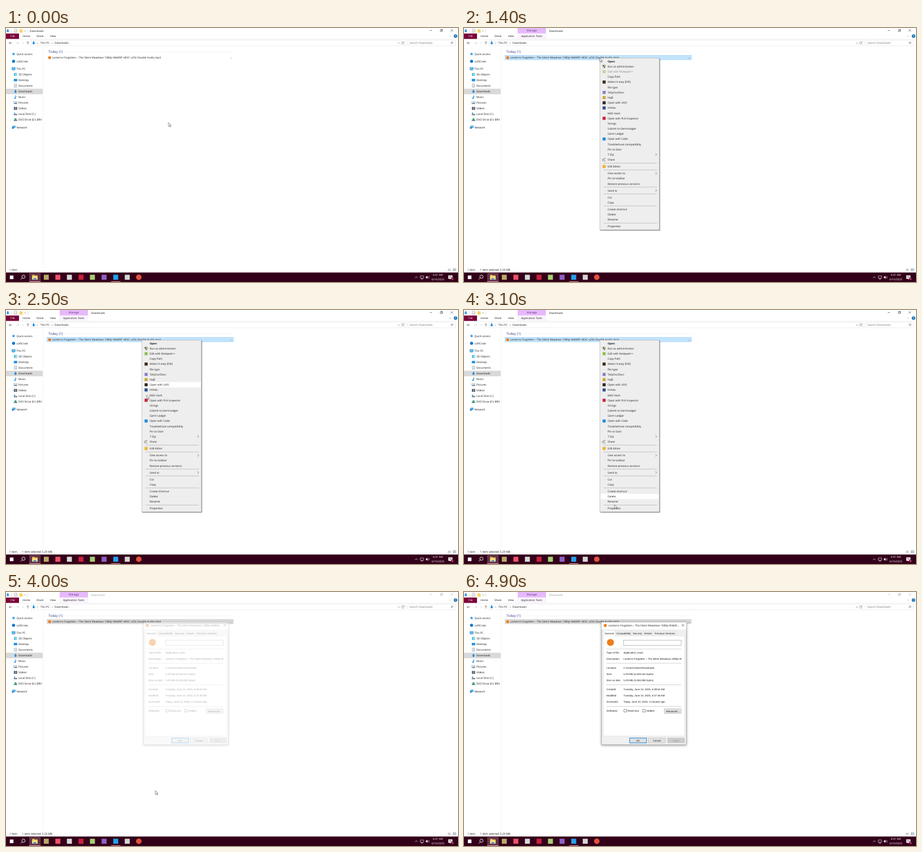
An HTML page for the animation above (5000 ms loop, 800 px wide and 450 px high).

```html
<!DOCTYPE html>
<html lang="en">
<head>
<meta charset="utf-8">
<title>Downloads</title>
<style>
html, body { margin: 0; width: 100%; height: 100%; overflow: hidden; background: #fff; }
svg { display: block; width: 800px; height: 450px; }
text { font-family: "Open Sans", "Noto Sans", sans-serif; text-rendering: geometricPrecision; white-space: pre; }
.dlg text.ms { font-family: "Liberation Sans", Arial, sans-serif; }

.plain, .picked, .hover, .blue, .grey, .menu { animation: 5s step-end infinite; }
.plain { animation-name: plain; }
.picked { animation-name: picked; }
.hover { animation-name: hover; }
.blue { animation-name: blue; }
.grey { animation-name: grey; }
.menu { animation-name: menu; }
.caption { animation: caption 5s step-end infinite; }
.late { animation: late 5s step-end infinite; }
.bar { animation: bar 5s step-end infinite; }
.ghost { animation: ghost 5s linear infinite; }
.dlg { animation: dlg 5s linear infinite; filter: drop-shadow(0 1px 2px rgba(0,0,0,.42)); }
.cursor { animation: move 5s linear infinite, gone 5s step-end infinite; }

@keyframes plain { 0% { opacity: 1 } 22%, 100% { opacity: 0 } }
@keyframes picked { 0% { opacity: 0 } 22%, 100% { opacity: 1 } }
@keyframes hover { 0% { opacity: 0 } 12% { opacity: 1 } 22%, 100% { opacity: 0 } }
@keyframes blue { 0% { opacity: 0 } 22% { opacity: 1 } 80%, 100% { opacity: 0 } }
@keyframes grey { 0% { opacity: 0 } 80%, 100% { opacity: 1 } }
@keyframes menu { 0% { opacity: 0 } 28% { opacity: 1 } 70%, 100% { opacity: 0 } }
@keyframes caption { 0% { opacity: 1 } 80%, 100% { opacity: .42 } }
@keyframes late { 0% { opacity: .5 } 40%, 100% { opacity: 1 } }
@keyframes ghost { 0%, 69.99% { opacity: 0 } 70% { opacity: 1 } 72% { opacity: .75 } 74%, 100% { opacity: 0 } }
@keyframes dlg { 0%, 79% { opacity: 0 } 82%, 100% { opacity: 1 } }
@keyframes bar {
  0% { transform: translateY(-20px) }
  46% { transform: translateY(68.3px) }
  48% { transform: translateY(105px) }
  50% { transform: translateY(132.5px) }
  52% { transform: translateY(169.2px) }
  54% { transform: translateY(196.7px) }
  56% { transform: translateY(233.4px) }
  58% { transform: translateY(266.7px) }
  60% { transform: translateY(300px) }
  62% { transform: translateY(330.3px) }
  64%, 100% { transform: translateY(351.6px) }
}
@keyframes move {
  0% { transform: translate(287.5px, 167.5px); animation-timing-function: ease-in-out }
  14% { transform: translate(241.5px, 51.5px) }
  20%, 44% { transform: translate(240.3px, 53px) }
  62% { transform: translate(266.5px, 345px); animation-timing-function: ease-out }
  67%, 72% { transform: translate(265.5px, 354.5px) }
  82%, 100% { transform: translate(264px, 351px) }
}
@keyframes gone { 0% { opacity: 1 } 90%, 100% { opacity: 0 } }
</style>
</head>
<body>
<svg id="stage" viewBox="0 0 800 450" xmlns="http://www.w3.org/2000/svg"></svg>
<script>
const INK = '#1b1b1b', WINE = '#7b0038', SKY = '#2389d7', CONE = '#ee7d1b';
const FILM = 'Lanterns Forgotten – The Silent Meadows';

// Text is placed by its left edge and vertical centre.
const text = (x, y, s, { size = 4.75, fill = INK, more = '' } = {}) =>
  `<text x="${x}" y="${(y + size * .36).toFixed(2)}" font-size="${size}" fill="${fill}" ${more}>${s}</text>`;
const mid = (x, y, s, o = {}) => text(x, y, s, { ...o, more: 'text-anchor="middle" ' + (o.more || '') });
const rect = (x, y, w, h, fill, more = '') =>
  `<rect x="${x}" y="${y}" width="${w}" height="${h}" fill="${fill}" ${more}/>`;
const box = (x, y, w, h, fill, edge, sw = .5) => rect(x, y, w, h, fill, `stroke="${edge}" stroke-width="${sw}"`);
const path = (d, stroke = INK, sw = .6, fill = 'none') =>
  `<path d="${d}" stroke="${stroke}" stroke-width="${sw}" fill="${fill}"/>`;
const shape = (d, fill) => `<path d="${d}" fill="${fill}"/>`;
const dot = (x, y, r, fill) => `<circle cx="${x}" cy="${y}" r="${r}" fill="${fill}"/>`;
const tile = (x, y, s, fill) => rect(x - s / 2, y - s / 2, s, s, fill);
const group = (cls, ...parts) => `<g class="${cls}">${parts.join('')}</g>`;

const right = (x, y, c = '#555', r = 1.2) => path(`M${x - r / 2} ${y - r}l${r} ${r}l${-r} ${r}`, c, .55);
const down = (x, y, c = '#555', r = 1.5) => path(`M${x - r} ${y - r / 2}l${r} ${r}l${r} ${-r}`, c, .6);
const getArrow = (x, y, s = 1) =>
  shape(`M${x - s} ${y - 3 * s}h${2 * s}v${2.8 * s}h${2 * s}l${-3 * s} ${3.2 * s}l${-3 * s} ${-3.2 * s}h${2 * s}z`, SKY);
const lens = (x, y, r, c, sw) =>
  `<circle cx="${x}" cy="${y}" r="${r}" fill="none" stroke="${c}" stroke-width="${sw}"/>` +
  path(`M${x - r * .7} ${y + r * .7}l${-r} ${r}`, c, sw);

function titleBar() {
  const head = getArrow(3.2, 5) + path('M10 2v6M38.5 2v6', '#aaa', .4) +
    box(14.8, 2, 4.4, 6, '#fff', '#888') + path('M15.8 5.2l1 1.2l1.8-2.6', '#c33', .5) +
    shape('M24 2h2.3l.8.8h2.4v5.4h-5.5z', '#f6d365') + down(33.8, 5.2, '#333', 1.1);
  const buttons = group('caption',
    path('M750 4.5h4M768.7 3.4h3v3h-3zM769.6 3.4v-.9h3v3h-.9M787.2 2.3l4 4M791.2 2.3l-4 4', INK, .5));
  const manage = group('picked',
    rect(95, 0, 50, 9.8, '#e6b9fb'), rect(95, 9.8, 50, 9.6, '#fbf5ff'),
    path('M95 9.8v9.6M145 9.8v9.6', '#e3d3ec', .4),
    mid(120, 4.5, 'Manage', { fill: '#5f2a78' }), mid(119.7, 14.6, 'Application Tools'),
    group('caption', text(150.5, 5, 'Downloads')));
  const tabs = rect(0, 9.8, 23, 9.7, WINE) + text(8, 14.6, 'File', { fill: '#fff' }) +
    text(29.3, 14.6, 'Home') + text(53.8, 14.6, 'Share') + text(78, 14.6, 'View');
  return head + group('plain', text(42, 5, 'Downloads')) + manage + buttons + tabs +
    path('M0 19.7h800', '#dedede', .5) + down(786, 14.4, '#888', 1.2) +
    dot(795.6, 14.3, 3.1, '#1673b8') + mid(795.6, 14.3, '?', { fill: '#fff', size: 4.6, more: 'font-weight="700"' });
}

function addressBar() {
  return path('M10.5 26.6h-4.8M7.7 24.6l-2 2l2 2', '#333') + path('M18 26.6h4.8M20.8 24.6l2 2l-2 2', '#c4c4c4') +
    down(30.2, 26.7, '#999', 1) + path('M38.8 29.2v-5M36.8 26.2l2-2l2 2', '#444') +
    box(44.5, 21.8, 663.5, 10, '#fff', '#dcdcdc') + getArrow(49, 26.5) +
    right(56, 26.7) + text(60.8, 26.6, 'This PC') + right(81.8, 26.7) + text(86, 26.6, 'Downloads') +
    down(695.3, 26.7, '#444', 1.3) + path('M698.4 22v9.6', '#e2e2e2', .4) +
    path('M704 25.3a2 2 0 1 0 .4 1.6M704.3 24v1.5h-1.6', '#444', .5) +
    box(711, 21.8, 84.5, 10, '#fff', '#dcdcdc') + text(714, 26.6, 'Search Downloads', { fill: '#777' }) +
    lens(789.6, 25.9, 1.5, '#555', .6);
}

function navPane() {
  const icons = {
    star: (x, y) => shape(`M${x} ${y - 3}l.9 2.1l2.2.1l-1.7 1.4l.6 2.2l-2-1.2l-2 1.2l.6-2.2l-1.7-1.4l2.2-.1z`, '#2f9be6'),
    cloud: (x, y) => dot(x, y, 2.8, '#1679cf'),
    pc: (x, y) => box(x - 3, y - 2.4, 6, 4, '#5cc0f2', '#2b78b5') + path(`M${x - 2} ${y + 2.5}h4`, '#2b78b5', .7),
    cube: (x, y) => rect(x - 2.6, y - 2.6, 5.2, 5.2, '#43b7d8') + rect(x - .6, y - 1.6, 3.2, 3.8, '#9be0ee'),
    desk: (x, y) => rect(x - 3, y - 2.2, 6, 4.2, '#1f8fe0'),
    doc: (x, y) => box(x - 2, y - 2.8, 4, 5.4, '#fff', '#777') + path(`M${x - 1.1} ${y - 1}h2.2m-2.2 1.2h2.2m-2.2 1.2h2.2`, '#4a8cc0', .4),
    get: (x, y) => getArrow(x, y),
    note: (x, y) => path(`M${x} ${y + 1.8}v-4.4q.4 1.6 1.8 2`, '#1487dc', .9) + dot(x - .9, y + 1.8, 1.2, '#1487dc'),
    pic: (x, y) => box(x - 3, y - 2.2, 6, 4.2, '#e8f4fb', '#888') + shape(`M${x - 2.6} ${y + 1.7}l2-2l1.4 1l1.4-.8v1.8z`, '#3a7f9f'),
    film: (x, y) => rect(x - 2.8, y - 2.5, 5.6, 5, '#3c3f4a') + rect(x - 1.6, y - 1.8, 3.2, 1.5, '#9fb6d4') + rect(x - 1.6, y + .3, 3.2, 1.5, '#9fb6d4'),
    disk: (x, y) => rect(x - 3, y, 6, 2, '#6a6f75') + rect(x - 2.6, y - 2.5, 2, 2, '#2a9be0'),
    dvd: (x, y) => dot(x, y - .7, 2, '#3fae7a') + rect(x - 3, y + .4, 6, 1.9, '#5a7f86'),
    net: (x, y) => box(x - 1.5, y - 2.6, 4.6, 3.4, '#58bff2', '#2b78b5') + dot(x - 1.3, y + .9, 1.8, '#2b84cf')
  };
  const rows = [
    ['star', 'Quick access', 45.8], ['cloud', 'LoftCrate', 59], ['pc', 'This PC', 72.3],
    ...['cube|3D Objects', 'desk|Desktop', 'doc|Documents', 'get|Downloads', 'note|Music', 'pic|Pictures',
      'film|Videos', 'disk|Local Disk (C:)', 'dvd|DVD Drive (D:) BRV']
      .map((s, i) => [...s.split('|'), 82.4 + i * 10, 3.4]),
    ['net', 'Network', 176]
  ];
  return rect(0, 107.6, 65, 9.8, '#d9d9d9') + path('M66 35v390', '#efefef', .6) +
    rows.map(([k, s, y, dx = 0]) => icons[k](13.4 + dx, y) + text(18.5 + dx, y, s)).join('');
}

function fileList() {
  const fill = (cls, c, edge) => group(cls, box(72.3, 48.2, 330.4, 8.2, c, edge));
  return text(75, 42.2, 'Today (1)', { size: 6.1, fill: '#2b3c86' }) + path('M103.5 42.2h296.5', '#e2e2e8', .5) +
    fill('hover', '#e2f1fe', '#e2f1fe') + fill('blue', '#c3e3fc', '#9acffa') + fill('grey', '#d9d9d9', '#d9d9d9') +
    dot(77.2, 52.6, 2.6, CONE) +
    text(81.6, 52.4, FILM + ' 1080p WebRIP HEVC x256 Double Audio.mp4') + text(396.7, 52.4, '...') +
    text(6, 428.6, '1 item') +
    group('picked', text(28.5, 428.6, '1 item selected'), text(63.8, 428.6, '5.29 MB')) +
    path('M782 427h5M782 428.5h5M782 430h5', '#777', .5) + box(791.5, 426.6, 4.6, 3.6, '#bcdcf2', '#777');
}

function taskbar() {
  const apps = [[71.3, '#b9a86a'], [91.8, '#ef5069'], [112.2, '#d8d8d8'], [132.8, '#c9213c'], [153, '#a6cf72'],
    [173.6, '#8d60c4'], [194.2, '#22a3ee'], [214.6, '#d5d5d5']];
  return rect(0, 433.2, 800, 16.8, '#33001a') + rect(41, 433.2, 20.4, 16.8, '#633548') +
    rect(41, 448.9, 20.4, 1.1, '#e08aaa') + rect(186, 448.9, 16.6, 1.1, '#e08aaa') +
    tile(10, 441.7, 6.4, '#fff') + lens(30.9, 440.6, 2.9, '#fff', .9) +
    shape('M46.3 437.4h3.6l1 1h5v7.2h-9.6z', '#f6cf58') + rect(46.3, 440.6, 9.6, 5, '#fbe08a') + rect(48.6, 443, 5, 2.6, '#3b97d8') +
    apps.map(([x, c]) => tile(x, 441.6, 8.8, c)).join('') + dot(235, 441.6, 4.9, '#e2513c') +
    path('M724 442.8l2.2-2.2l2.2 2.2', '#fff', .7) +
    path('M733.2 439.3h6v4h-6zM734.5 445h3.4M736.2 443.3v1.7', '#fff', .6) +
    shape('M743 440.6h1.3l1.7-1.6v5.4l-1.7-1.6h-1.3z', '#fff') +
    path('M747 440.3q1 1.4 0 2.8M748.3 439.3q1.7 2.4 0 4.8', '#fff', .5) +
    mid(764.4, 437.7, '6:41 AM', { fill: '#fff' }) + mid(764.4, 445.4, '6/10/2025', { fill: '#fff' }) +
    shape('M782.8 438.2h7.4v6h-3l-1.4 1.5v-1.5h-3z', '#fff') + path('M784 440h5M784 441.6h5', '#33001a', .5) +
    dot(790, 444.6, 2.5, '#8a1d45') + mid(790, 444.6, '1', { fill: '#fff', size: 3.8 });
}

function contextMenu() {
  // "-" is a divider; ">" marks a submenu.
  const items = ['Open', 'Run as administrator', 'Edit with Notepad++', 'Copy Path', 'detect it easy (DIE)', 'file type',
    'TallyOurDocs', 'NqB', 'Open with UVO', 'ImHex', 'Md5 Hash', 'Open with PLK Inspector', 'Strings',
    'Submit to GermLedger', 'Germ Ledger', 'Open with Code', 'Troubleshoot compatibility', 'Pin to Start', '>7-Zip',
    'Share', '-', '638 Editor', '-', '>Give access to', 'Pin to taskbar', 'Restore previous versions', '-', '>Send to', '-',
    'Cut', 'Copy', '-', 'Create shortcut', 'Delete', 'Rename', '-', 'Properties'];
  const icons = { 2: '#8cc152', 4: '#3a2c1e', 6: '#8f7bc8', 7: '#c9a93a', 8: '#2e2a22', 9: '#2c4f8f', 11: '#c9213c', 15: '#1f8fd8', 21: '#efb52c' };
  let y = 59.1, out = '';
  items.forEach((s, i) => {
    if (s === '-') {
      out += path(`M247 ${y - 3.1}h94.5`, '#989898', .5);
      y += 2.9;
      return;
    }
    const sub = s[0] === '>';
    let row = text(254.3, y, sub ? s.slice(1) : s, { more: i ? '' : 'font-weight="700"' });
    if (icons[i]) row += tile(248, y, 5.4, icons[i]);
    if (sub) row += right(340, y, '#333', 2.1);
    out += i === 2 ? group('late', row) : row;
    y += 9.17;
  });
  const shield = shape('M245.2 65.8q1.6 0 2.8-.8q1.2.8 2.8.8q0 4.2-2.8 5.8q-2.8-1.6-2.8-5.8z', '#3c6fb5') +
    shape('M248 65v3.3h2.6q.3-1 .2-2.5q-1.6 0-2.8-.8zM248 68.3v3.3q-1.8-1-2.5-3.3z', '#efc53a');
  const share = path('M247.2 232h-2v3.6h4.6v-1.4M246.6 234q.2-2.6 3-2.8M248.6 229.9l1.5 1.3l-1.5 1.4', '#444', .5);
  return group('menu',
    rect(241.8, 54.8, 105.6, 304.6, '#000', 'opacity=".2"'), rect(241.2, 54.2, 105.5, 304.4, '#000', 'opacity=".35"'),
    box(240.3, 53.2, 105.6, 304.6, '#eeeeee', '#9c9c9c'),
    group('bar', rect(241.6, -4.6, 103.4, 9.17, '#fff')), out, shield, share) +
    group('ghost', path('M243 356.4h101.5', '#e2e2ea', .6), text(254.3, 351.6, 'Properties', { fill: '#333' }));
}

function dialog() {
  const ms = (x, y, s, fill = INK) => text(x, y, s, { size: 4.5, fill, more: 'class="ms"' });
  const button = (x, y, w, s, edge = '#adadad', sw = .5, fill = '#e1e1e1', ink = INK) =>
    box(x, y, w, 8.4, fill, edge, sw) + mid(x + w / 2, y + 4.3, s, { size: 4.5, fill: ink, more: 'class="ms"' });
  const facts = [
    ['Type of file:', 'Application (.exe)', 107.6], ['Description:', FILM + ' 1080p WebRIP', 118.4],
    ['Location:', 'C:\\Users\\Visitor\\Downloads', 134.6], ['Size:', '5.29 MB (5,549,441 bytes)', 145.5],
    ['Size on disk:', '5.29 MB (5,550,080 bytes)', 156.3], ['Created:', 'Tuesday, June 10, 2025, 6:38:52 AM', 172.6],
    ['Modified:', 'Tuesday, June 10, 2025, 6:37:36 AM', 183.4], ['Accessed:', 'Today, June 10, 2025, 3 minutes ago', 194.3],
    ['Attributes:', '', 210.6]
  ];
  const tabs = [['Compatibility', 267.2, 29.3], ['Security', 296.5, 20.2], ['Details', 316.7, 18.6], ['Previous Versions', 335.3, 40]];
  return group('dlg',
    box(243.3, 53.3, 150.4, 217.4, '#f0f0f0', '#8b8b8b'), rect(243.6, 53.6, 149.8, 12.6, '#fff'),
    dot(250, 59.2, 2.7, CONE), text(255.5, 59.3, FILM + ' 1080p WebRI...'),
    path('M385.5 57l4 4M389.5 57l-4 4', INK, .55),
    tabs.map(([s, x, w]) => box(x, 69.2, w, 8.8, '#f0f0f0', '#d9d9d9') + ms(x + 2.2, 73.6, s)).join(''),
    box(246.6, 78, 143.6, 177, '#fff', '#dcdcdc'),
    path('M247 78.4v-10.2h20.2v10.2', '#d9d9d9', .5, '#fff'), ms(249, 73.2, 'General'),
    dot(259.2, 89.4, 6.2, CONE), box(282.7, 85.2, 102, 9.2, '#fff', '#7a7a7a'),
    path('M252 101h132.5M252 126.2h132.5M252 164.4h132.5M252 202.6h132.5', '#a5a5a5', .5),
    '<clipPath id="fit"><rect x="246" y="100" width="139" height="120"/></clipPath><g clip-path="url(#fit)">',
    facts.map(([k, v, y]) => ms(252.2, y, k) + ms(282.3, y, v)).join(''), '</g>',
    box(283, 208, 4.8, 4.8, '#fff', '#333'), ms(289.3, 210.6, 'Read-only'),
    box(316.2, 208, 4.8, 4.8, '#fff', '#333'), ms(323, 210.6, 'Hidden'),
    button(354.2, 206.8, 30.2, 'Advanced...'),
    button(293.2, 258.8, 29.8, 'OK', '#0078d7', .9), button(326.6, 258.8, 30, 'Cancel'),
    button(360.4, 258.8, 30, 'Apply', '#bfbfbf', .5, '#cccccc', '#9a9a9a'));
}

const cursor = group('cursor', path('M0 0v6.9l1.6-1.5l1.1 2.6l1.2-.5l-1.1-2.5h2.2z', '#222', .5, '#fff'));

document.getElementById('stage').innerHTML =
  rect(0, 0, 800, 450, '#fff') + titleBar() + addressBar() + navPane() + fileList() +
  taskbar() + contextMenu() + dialog() + cursor;
</script>
</body>
</html>
```
